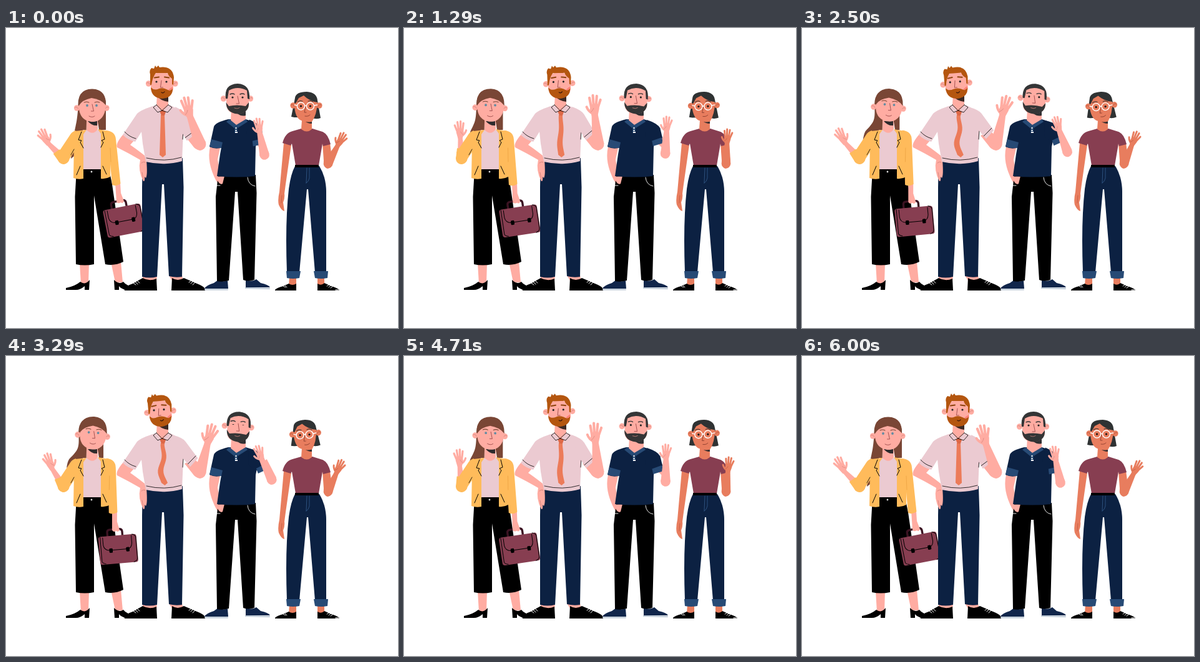
Animation of 628 by 480 pixels, one loop 6.07 s. Source, as an HTML page:

```html
<!DOCTYPE html>
<html lang="en">
<head>
<meta charset="utf-8">
<title>Waving team</title>
<style>
html, body { margin: 0; width: 100%; height: 100%; overflow: hidden; background: #fff; }
svg { display: block; width: 628px; height: 480px; }
</style>
</head>
<body>
<svg id="stage" viewBox="0 0 628 480"></svg>
<script>
const LOOP = 6070;
const PINK = '#ffaca2', TAN = '#e87d5e', NAVY = '#0c2142', BLUE = '#274a75', PLUM = '#873e51',
  YELLOW = '#ffbb5b', SHIRT = '#ebcad1', BROWN = '#794635', GINGER = '#b4560f', DARK = '#343536', BLACK = '#000';

const shape = (d, fill) => `<path d="${d}" fill="${fill}"/>`;
const line = (d, color = BLACK, w = 1) =>
  `<path d="${d}" fill="none" stroke="${color}" stroke-width="${w}" stroke-linecap="round" stroke-linejoin="round"/>`;
const oval = (x, y, rx, ry, fill) => `<ellipse cx="${x}" cy="${y}" rx="${rx}" ry="${ry}" fill="${fill}"/>`;
const group = (id, ...parts) => `<g id="${id}">${parts.join('')}</g>`;
const ears = (x1, x2, y, skin, ink) => oval(x1, y, 4.6, 4.8, skin) + oval(x2, y, 4.6, 4.8, skin) +
  line(`M${x1 - 3},${y - 1}q3,-2 5,2M${x2 + 3},${y - 1}q-3,-2 -5,2`, ink, .7);
const eyes = (id, x1, x2, y, r, fill) => group(id, oval(x1, y, r, r, fill), oval(x2, y, r, r, fill));

// Open hand, wrist at 0,0, fingers up, thumb to the right unless flipped
const hand = (id, len, size, flip, skin, ink) => `<g transform="translate(0,${-len}) scale(${flip ? -size : size},${size})"><g id="${id}">` +
  shape('M-3.500,3L-6,-7Q-6,-14 0,-14Q6,-13 6,-6L3.500,3Z', skin) +
  line('M-4.500,-9L-8,-18.500M-2,-10L-3.500,-23.500M1,-10L1.500,-24.500M4,-9L6,-21.500', skin, 3.3) +
  line('M2,-1Q8,-4 10,-10', skin, 3.2) + line('M5,-3Q2,-5 1,-8', ink, .6) + '</g></g>';

const forearm = (id, len, wide, thin, size, flip, skin, ink, extra = '') => group(id,
  oval(0, 0, wide, wide, skin),
  shape(`M${-wide},0L${-thin},${-len}H${thin}L${wide},0Z`, skin),
  hand(id + 'Hand', len, size, flip, skin, ink), extra);

const woman1 = [
  `<path id="hair" fill="${BROWN}"/>`,
  shape('M118,376H133L132,409H120ZM168,374H184L187,407H175Z', PINK),
  shape('M96,419V416Q111,413 119,406Q127,412 134,403L133,419H126V413Q119,419 112,419ZM173,403Q181,411 188,406Q193,413 206,414V419H192Q184,417 181,413V419H174Z', BLACK),
  shape('M113,226H165L170,250L188,374Q174,381 159,378L141,268V378Q126,381 112,378L110.500,270Z', BLACK),
  shape('M123,163H153V226H123Z', SHIRT),
  shape('M129,146H147V162Q139,173 129,163Z', PINK),
  shape('M131,149H146V156Q138,157 131,149Z', '#2d2b2c'),
  shape('M129,163L111,165L109,185L108,240Q116,243 124,241V170ZM147,162L165,165L168,190L167,238Q160,242 152,241V169Z', YELLOW),
  line('M121,166L116,179L121,180L119,183L124,192M155,166L158,178L153,180L156,183L152,191M119,221L113,235M155,221L161,234'),
  oval(137, 230, 1.4, 1.4, '#d8d8d8'),
  group('bagArm',
    group('bag',
      line('M-14,-22V-28Q-14,-32 -9,-32H5Q10,-32 10,-28V-22', '#3b1322', 3.4),
      shape('M-25,-22H28Q32,-22 32,-18V19Q32,23 28,23H-25Q-29,23 -29,19V-18Q-29,-22 -25,-22Z', PLUM),
      line('M-26,-21V18Q-25,21 -20,22M25,22.500Q31,21 31,16V-17Q30,-21 25,-22M-22,-20V-8Q-21,0 -13,1H17Q23,0 24,-8V-20'),
      '<rect x="-13" y="-2" width="5.500" height="7" rx="1.500"/><rect x="14" y="-2" width="5.500" height="7" rx="1.500"/>'),
    shape('M175,248H183L184,264L189,277Q187,282 184,279Q179,282 177,278Z', PINK),
    shape('M160,164Q175,165 176,178L183.500,249Q177,254 170,251L165,195Z', YELLOW),
    line('M167,192L168,214', '#e69b3b', .6)),
  forearm('arm1', 35, 6, 3.4, 1, false, PINK, '#d8867e',
    oval(0, 0, 9, 9, YELLOW) + shape('M-9,0L-6,-17L6,-15L9,0Z', YELLOW)),
  shape('M112,164Q105,166 102,172L84,199Q84,215 92,218Q100,217 102,209L112,194Z', YELLOW),
  line('M109,194L104,203', BLACK, .8),
  group('head1',
    shape('M116,130Q112,98 138,97.500Q162,98 160,130Z', BROWN),
    ears(113.5, 161, 128, PINK, '#c67972'),
    shape('M137,112Q122,115 117,124C116,141 126,150 139,150C151,150 160,140 159.500,123Q152,114 137,112Z', PINK),
    group('face1',
      line('M125,119q4,-2 8,0M142,119q4,-2 8,0', BROWN, 1),
      line('M138,122L140.500,133H136.500M133,141q5,3 9,0', '#9b4a4a', .9),
      eyes('eyes1', 130, 145, 124, 1.9, '#628ca3')))
];

const man2 = [
  shape('M219,396H242L241,405H219ZM261,396H282L284,404H266Z', PINK),
  shape('M190,420Q188,414 203,409L219,400Q230,406 241,401L242,420ZM319,420Q320,414 306,409L285,400Q275,406 266,400L265,420Z', BLACK),
  line('M204,408l4,3M207,406l4,4M210,404l4,4M293,407l4,-3M296,409l4,-4M299,411l4,-4', '#fff', 1),
  shape('M219,208H283L284.500,255L282,398Q272,400 261,397L253,250H250L242,398Q230,401 218,398V255Z', NAVY),
  shape('M188,170Q175,185 178,191Q196,200 215,211Q211,228 220,245Q223,246 222,238L224,240Q227,236 225,212L222,204Q208,193 199,187L207,178Z', PINK),
  line('M217,216Q221,213 223,215M218,231L220,241', '#c67972', .7),
  shape('M286,172L303,166L319,181Q322,193 311,196Q303,195 298,187Z', PINK),
  shape('M238,124Q216,131 210,137L187,171Q195,179 207,182L217,166L219,185L224,214Q254,221 282,213L284,165L291,150Q287,135 264,124Z', SHIRT),
  line('M190,166Q197,174 208,177M225,208Q254,215 281,207M284,165L283,178', BLACK, .8),
  group('sleeve2', shape('M270,126Q285,132 289,139L305,168L291,180L278,160Z', SHIRT), line('M302,164L288,175', BLACK, .8)),
  shape('M242,106H260V123L250,134L241,123Z', PINK),
  shape('M244,111L260,105V118Q250,117 244,111Z', '#3c2924'),
  '<path id="tie" fill="#ec7b59"/>',
  shape('M246.500,134L251,131L256,134L254,140H249Z', '#dd6847'),
  line('M241,123L236,127L243,135L250,132L259,135L266,127L260,123M241,123L250,132L260,123', BLACK, .8),
  forearm('arm2', 48, 9.5, 5, 1.25, true, PINK, '#d8867e'),
  group('head2',
    ears(228.5, 271, 89, PINK, '#c67972'),
    shape('M232,76Q249,66 268,76V98Q265,112 250,112Q234,112 232,97Z', PINK),
    shape('M231,91V74Q229,68 233,64L237,65L239,60L241,63L244,60L246,63Q267,60 269,79L268,91L266,90V81Q260,77 259,72L240,72Q235,78 233,91Z', GINGER),
    shape('M232,95L236,98Q241,99 244,97.500Q250,95 257,98Q263,102 267,97Q267,112 250,113Q233,112 232,95Z', GINGER),
    line('M262,99L266,96', '#ff7e75', 2.500),
    line('M249,103Q252,105 254,102', '#3a170c', 1.3),
    group('face2',
      line('M238,79.500L245,78.500M254,78.500L261,79.500', '#8b420c', 2),
      line('M249,84L247.500,95H251.500', '#9b4a4a', .9),
      eyes('eyes2', 241, 257, 86, 1.6, '#262626')))
];

const man3 = [
  shape('M318,417Q320,412 333,408L340,403Q348,407 355,404L356,417ZM423,415Q421,411 408,408L401,402Q393,407 384,402V415Z', '#11264b'),
  line('M319,418.500H355M384,416L422,417', '#b9c6d3', 2),
  shape('M327,190Q321,215 337,245Q342,253 347,250L351,238Q340,223 339,210L343,192Z', PINK),
  shape('M340,235H400L401.500,264L398,403Q388,406 380,403L371,262H367L357,404Q347,407 338,405L336,270Z', BLACK),
  shape('M336,238Q342,253 347,249L350,237Z', PINK),
  line('M387,239Q388,251 399,253M338,252L343,252', '#fff', .9),
  shape('M356,146Q335,151 333,158L326,190Q337,195 345,191L343,202L338,237Q370,240 399,237L400,190L407,157Q402,151 384,146Z', NAVY),
  shape('M329,178L347,183L345,192Q334,193 326,190Z', BLUE),
  group('upper3', shape('M-6,-10L-20,-24L-8,-33L7,-4L-2,8Z', PINK)),
  group('sleeve3', shape('M388,148Q406,151 411,158L417,173L402,183L389,175Z', NAVY), shape('M401,180L416,172L419,181L404,188Z', BLUE)),
  shape('M361,130H384V148L369,157L360,148Z', PINK),
  shape('M371,137L384,133V140Q377,142 371,137Z', '#303033'),
  shape('M358,146L353,150L368,162L387,150L384,146L369,155Z', BLUE),
  shape('M366,158H371V168H366Z', '#1b3c66'),
  oval(368.5, 160, 1.2, 1.2, '#fff'), oval(368.5, 164, 1.2, 1.2, '#fff'), shape('M367,166H371V168H367Z', '#fff'),
  forearm('arm3', 36, 7.8, 4.2, .95, true, PINK, '#d8867e'),
  group('head3',
    ears(348.5, 391.5, 113, PINK, '#c67972'),
    shape('M353,100Q370,89 389,100V125Q385,137 370,137Q355,137 353,124Z', PINK),
    shape('M352,113Q349,90 371,89Q392,90 390,114L387,113L386,100Q371,92 357,100L355,113Z', DARK),
    shape('M352.500,119L357,125Q370,122 384,125L389,119Q390,136 371,137.500Q353,136 352.500,119Z', DARK),
    line('M366,128Q371,130 374,127.500', '#b97a74', .9),
    group('face3',
      line('M359,106q4,-2 7,0M375,106q4,-2 7,0', DARK, 1.400),
      line('M371,109L373.500,121H369', '#9b4a4a', .9),
      eyes('eyes3', 363, 379, 111, 1.6, '#262626')))
];

const woman4 = [
  shape('M454,398H465L465,412H453ZM499,398H510L510,412H499Z', TAN),
  shape('M431,419Q433,416 444,413L453,409Q459,413 465,409V420H431ZM534,419Q531,416 521,413L510,408Q505,413 499,409V420H533Z', BLACK),
  line('M444,413l4,2M447,412l3,3M514,413l3,-2M517,415l3,-3M520,416l3,-2', '#fff', .9),
  line('M528,419H533', '#c9c9c9', 1.500),
  shape('M445,184L457,187L448,250L446,265Q447,272 444,279L446,293Q441,292 437,283Q435,275 438,262Z', TAN),
  line('M442,268L441,280', '#b9553d', .7),
  shape('M463,221H502Q513,239 513,262V391H495L484,258H482L470,391H450Q447,310 453,258Q456,234 463,221Z', NAVY),
  shape('M449,389H472L470,400Q460,402 450,400ZM493,389H516L515,400Q504,402 495,400Z', BLUE),
  line('M482,224L481,248M486,224V240Q485,246 481,248', '#3c6698', .7),
  shape('M507,184L519,184L523,214Q522,225 515,225Q508,223 509,212Z', TAN),
  shape('M473,161L459,165Q447,168 443,184L456,188L458,185L464,220H501L507,185L508,189L520,186Q516,169 507,166L491,161Z', PLUM),
  shape('M463,219H501V223H463Z', BLACK),
  shape('M474,147H490V162Q482,169 473,162Z', TAN),
  shape('M477,148H490V153Q483,153 477,148Z', '#332c2d'),
  forearm('arm4', 33, 7.3, 3.6, .9, true, TAN, '#b9553d'),
  group('head4',
    shape('M463,112Q464,102 482,102Q498,103 499,116L504,144Q496,147 488,143H462L457,142Z', '#2f3233'),
    ears(460, 502, 124, TAN, '#a84e37'),
    shape('M469,112L462,124Q463,142 471,147Q480,152 490,150Q498,139 499,119Q486,117 477,108Z', TAN),
    group('face4',
      line('M467,118q4,-3 8,-1M484,117q4,-2 8,1', '#2f3233', 1),
      eyes('eyes4', 472.500, 487.500, 125, 1.7, '#2b1d1b'),
      '<g fill="none" stroke="#fff" stroke-width="1.400"><circle cx="472.500" cy="125" r="6"/><circle cx="487.500" cy="125" r="6"/><path d="M478.500,125q1.500,-1.500 3,0M466.500,124L462,123M493.500,124L499,123"/></g>',
      line('M480,126L478,135H481M479,141Q484,142 487,139', '#8d3f30', .9)))
];

const stage = document.getElementById('stage');
stage.innerHTML = [woman1, man2, man3, woman4].flat().join('');
const el = id => document.getElementById(id);
const set = (id, value) => el(id).setAttribute('transform', value);
const turn = (id, a, x, y, dx = 0, dy = 0) => set(id, `translate(${dx},${dy}) rotate(${a},${x},${y})`);
const mix = (a, b, k) => a + (b - a) * k;
const sine = k => (1 - Math.cos(Math.PI * k)) / 2;

function keyed(t, keys) {
  const i = Math.max(1, keys.findIndex(k => k[0] >= t));
  const [t0, a] = keys[i - 1], [t1, b] = keys[i];
  return mix(a, b, sine((t - t0) / (t1 - t0)));
}

function blink(id, t, y, ...times) {
  const shut = Math.max(0, ...times.map(x => 1 - Math.abs(t - x) / 150));
  const s = 1 - .75 * Math.min(1, shut * 1.3);
  set(id, `translate(0,${y * (1 - s)}) scale(1,${s})`);
}

// Elbow position, arm angle and the extra bend of the wrist
function wave(id, x, y, a, bend = 0) {
  set(id, `translate(${x},${y}) rotate(${a})`);
  set(id + 'Hand', `rotate(${bend})`);
}

function tiePath(u) {
  const left = [], right = [];
  for (let y = 139; y <= 203; y += 4) {
    const k = (y - 139) / 64;
    const x = 251 + 4 * u * Math.sqrt(k) * Math.sin(k * 8 - .85);
    const w = 3 + 2 * k;
    left.push(`${x - w},${y}`);
    right.unshift(`${x + w},${y}`);
  }
  return `M${left.join('L')}L${251 + 3.5 * u},207L${right.join('L')}Z`;
}

function draw(t) {
  const u = sine(2 * t / LOOP);

  // The loose hair hangs close to the face, then flares out behind the shoulder
  el('hair').setAttribute('d', `M138,98Q117,98 116,122C${114 + 4 * u},148 ${113 + 3 * u},150 ${110 - 9 * u},165` +
    `Q${109 - 11 * u},170 ${104 - 7 * u},${209 - 31 * u}L128,190L129,150H147L149,163H${160 - 4 * u}V118Q158,98 138,98Z`);
  turn('head1', 4 * u, 138, 140, .5 * u, -.5 * u);
  set('face1', `translate(${u},${-u})`);
  turn('bagArm', 4 * u, 168, 175);
  set('bag', `translate(187.500,308) rotate(${mix(-11, -8.700, u)})`);
  const a1 = keyed(t, [[0, -45], [1450, -2], [2700, -45], [4350, 0], [LOOP, -45]]);
  wave('arm1', 92, 209, a1, -.35 * a1);

  turn('head2', -5 * u, 250, 110, -u, 0);
  set('face2', `translate(${-u},0)`);
  turn('sleeve2', mix(2, -8, u), 273, 148);
  wave('arm2', 311, 186, mix(-20, 15, u), mix(-6, -2, u));
  el('tie').setAttribute('d', tiePath(u));

  turn('head3', 4 * u, 370, 130, .5 * u, 0);
  set('face3', `translate(${-u},${-u})`);
  turn('sleeve3', mix(14, 0, u), 395, 155);
  const a3 = keyed(t, [[0, -12], [1100, 4], [3100, -27], [4900, 2], [LOOP, -12]]);
  const ex = mix(414, 426, u), ey = mix(203, 198, u);
  set('upper3', `translate(${ex},${ey})`);
  wave('arm3', ex, ey, a3, .2 * a3);

  turn('head4', -4 * u, 482, 140, -.5 * u, 0);
  set('face4', `translate(0,${u})`);
  wave('arm4', 516, 217, keyed(t, [[0, 28], [1450, 2], [2950, 28], [4300, 2], [LOOP, 28]]), -1);

  blink('eyes1', t, 124, 4210);
  blink('eyes2', t, 86, 1790, 4210);
  blink('eyes3', t, 111, 790, 3290);
  blink('eyes4', t, 125, 5210);
}

function tick() {
  draw(performance.now() % LOOP);
  requestAnimationFrame(tick);
}
tick();
</script>
</body>
</html>
```
